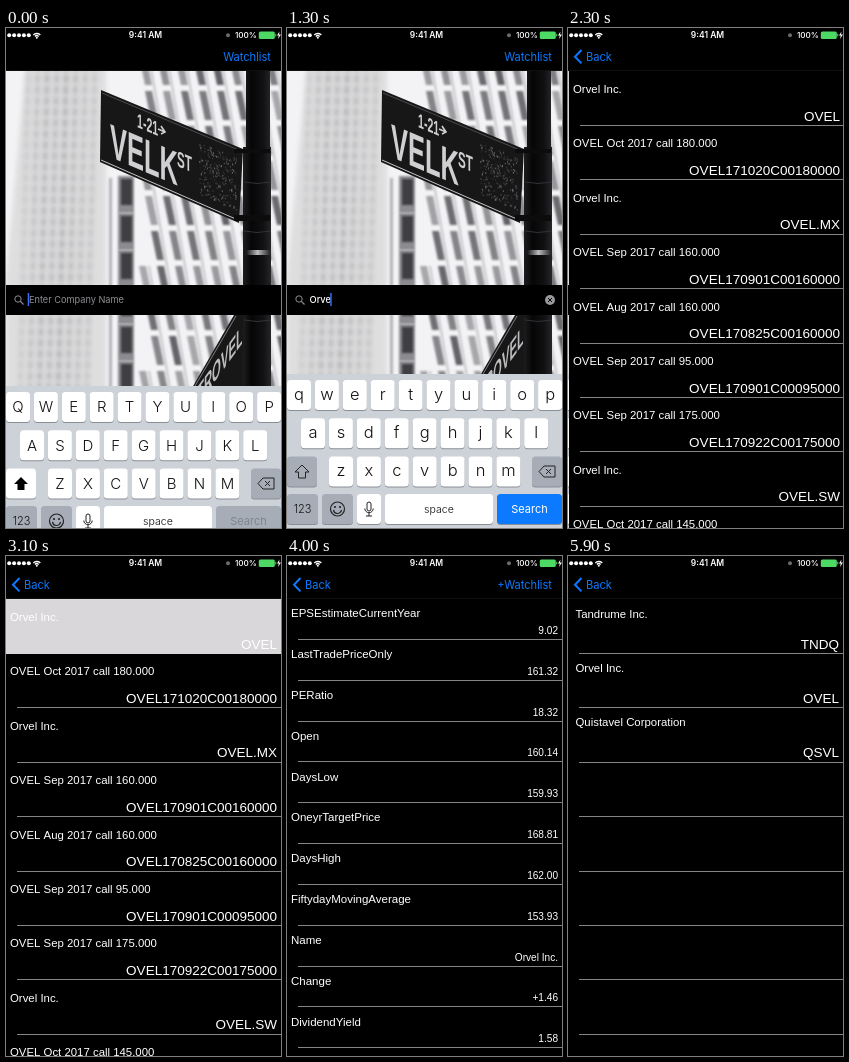
Write an HTML page with a canvas that moves like this. It is 275 px wide and 500 px high and loops after 6200 ms.

```html
<!DOCTYPE html>
<html lang="en">
<head>
<meta charset="utf-8">
<title>Stock lookup</title>
<style>
  html, body { margin: 0; width: 100%; height: 100%; overflow: hidden; background: #000; }
  canvas { display: block; width: 275px; height: 500px; }
</style>
</head>
<body>
<canvas id="stage"></canvas>
<script>
const W = 275, H = 500, LOOP = 6200, STEP = 100, NAV = 43;
const SANS = '"Liberation Sans", Arial, sans-serif';
const UI = 'Inter, Roboto, sans-serif';
const BLUE = '#0b7aff';
const COMPANY = 'Orvel', TICKER = 'OVEL';
const PUSH = { list: 1874, detail: 3540, watch: 4860 };
const SELECT_AT = 3100, SEARCH_AT = 1700, BUTTON_AT = 4800;
const TYPED_AT = [500, 700, 900, 1100, 1500];

const quotes = [
  [COMPANY + ' Inc.', TICKER],
  [TICKER + ' Oct 2017 call 180.000', TICKER + '171020C00180000'],
  [COMPANY + ' Inc.', TICKER + '.MX'],
  [TICKER + ' Sep 2017 call 160.000', TICKER + '170901C00160000'],
  [TICKER + ' Aug 2017 call 160.000', TICKER + '170825C00160000'],
  [TICKER + ' Sep 2017 call 95.000', TICKER + '170901C00095000'],
  [TICKER + ' Sep 2017 call 175.000', TICKER + '170922C00175000'],
  [COMPANY + ' Inc.', TICKER + '.SW'],
  [TICKER + ' Oct 2017 call 145.000', '']
];
const details = [
  ['EPSEstimateCurrentYear', '9.02'], ['LastTradePriceOnly', '161.32'],
  ['PERatio', '18.32'], ['Open', '160.14'], ['DaysLow', '159.93'],
  ['OneyrTargetPrice', '168.81'], ['DaysHigh', '162.00'],
  ['FiftydayMovingAverage', '153.93'], ['Name', COMPANY + ' Inc.'],
  ['Change', '+1.46'], ['DividendYield', '1.58']
];
const watched = [
  ['Tandrume Inc.', 'TNDQ'], [COMPANY + ' Inc.', TICKER],
  ['Quistavel Corporation', 'QSVL']
];

const canvas = document.getElementById('stage');
const scale = window.devicePixelRatio || 1;
canvas.width = W * scale;
canvas.height = H * scale;
const screen = canvas.getContext('2d');
let g = screen;

// Critically damped spring: 1 at the start, settling to 0.
function spring(ms) {
  if (ms <= 0) return 1;
  const u = ms / 1000 * 18.26;
  return u > 8 ? 0 : (1 + u) * Math.exp(-u);
}

function random(seed) {
  return () => (seed = (seed * 16807) % 2147483647) / 2147483647;
}

function text(str, x, y, size, color = '#fff', align = 'left', family = SANS, weight = 400) {
  g.font = `${weight} ${size}px ${family}`;
  g.fillStyle = color;
  g.textAlign = align;
  g.fillText(str, x, y);
}

function box(x, y, w, h, color, radius = 0) {
  g.fillStyle = color;
  g.beginPath();
  g.roundRect(x, y, w, h, radius);
  g.fill();
}

function poly(points, fill, stroke, width = 1) {
  g.beginPath();
  points.forEach(([x, y], i) => i ? g.lineTo(x, y) : g.moveTo(x, y));
  g.closePath();
  if (fill) { g.fillStyle = fill; g.fill(); }
  if (stroke) { g.strokeStyle = stroke; g.lineWidth = width; g.stroke(); }
}

function line(points, color, width) {
  g.beginPath();
  points.forEach(([x, y], i) => i ? g.lineTo(x, y) : g.moveTo(x, y));
  g.strokeStyle = color;
  g.lineWidth = width;
  g.stroke();
}

function circle(x, y, r, fill, stroke, width = 1) {
  g.beginPath();
  g.arc(x, y, r, 0, Math.PI * 2);
  if (fill) { g.fillStyle = fill; g.fill(); }
  if (stroke) { g.strokeStyle = stroke; g.lineWidth = width; g.stroke(); }
}

function group(draw) {
  g.save();
  draw();
  g.restore();
}

// ---- Street picture ----

function drawBuildings() {
  const rnd = random(71);
  box(0, 33, W, 340, '#f3f3f5');
  g.filter = `blur(${2 * scale}px)`;
  poly([[20, 33], [100, 33], [100, 373], [0, 373], [0, 250]], '#dededf');
  for (let col = 0; col < 8; col++) {
    const shade = .2 + rnd() * .3;
    for (let y = 36; y < 370; y += 11) {
      box(21 + col * 9.5 - y * .025, y, 4.5, 8, `rgba(120,120,125,${shade})`);
    }
  }
  g.filter = `blur(${1.3 * scale}px)`;
  for (let y = 148; y < 370; y += 37) {
    box(112, y, 16, 37, '#8c8c90');
    box(115, y + 3, 11, 26, '#3f3f43');
  }
  box(103, 150, 3, 220, '#b4b4b8');
  for (let row = 0; row < 10; row++) {
    for (let col = -3; col < 9; col++) {
      const x = 133 + col * 18 + row * 6, y = 28 + row * 35;
      if (x < 130) continue;
      poly([[x, y], [x + 7, y], [x + 13, y + 29], [x + 6, y + 29]],
        `rgba(70,70,76,${.4 + rnd() * .45})`);
      line([[x + 10, y], [x + 16, y + 35]], 'rgba(120,120,126,.45)', 1.5);
    }
  }
  g.filter = 'none';
}

function drawPole() {
  const steel = g.createLinearGradient(237, 0, 266, 0);
  steel.addColorStop(0, '#1d1d1f');
  steel.addColorStop(.3, '#060607');
  steel.addColorStop(.7, '#111113');
  steel.addColorStop(1, '#29292b');
  box(240, 43, 24, 78, steel);
  box(237, 119, 28, 245, steel);
  box(228, 121, 36, 4, '#0c0c0d');
  box(228, 187, 36, 6, '#0c0c0d');
  for (const y of [154, 203, 292]) line([[238, y], [251, y + 1.5], [265, y]], '#333336', 1);
  const shine = g.createLinearGradient(238, 0, 265, 0);
  shine.addColorStop(.1, '#1a1a1c');
  shine.addColorStop(.5, '#bcbcbe');
  shine.addColorStop(.95, '#2a2a2c');
  box(238, 222, 27, 5, shine);
}

function drawSigns() {
  const rnd = random(9);
  poly([[95, 62], [237, 121], [233, 195], [94, 134]], '#171718');
  line([[96, 65], [235, 123]], '#58585b', .8);
  line([[95, 132], [232, 192]], '#c4c4c7', 1);
  for (let i = 0; i < 300; i++) {
    const x = 193 + rnd() * 37, y = 114 + (x - 193) * .42 + rnd() * 52;
    box(x, y, 1, 1 + rnd(), `rgba(190,190,194,${rnd() * .5})`);
  }
  // Lettering lies in the plane of the plate.
  const onPlate = (str, x, y, size) => group(() => {
    g.transform(.53, .225, 0, 1, x, y);
    text(str, 0, 0, size, '#d0d0d2', 'left', SANS, 700);
  });
  onPlate('VELK', 104, 129, 48);
  onPlate('ST', 171, 138, 22);
  onPlate('1-21', 131, 99, 20);
  line([[152, 101], [159, 104]], '#d0d0d2', 1.6);
  line([[155, 98], [159, 104], [155, 106]], '#d0d0d2', 1.6);

  poly([[186, 360], [228, 287], [238, 287], [238, 362]], '#171718');
  line([[189, 358], [230, 288]], '#9a9a9d', .8);
  group(() => {
    g.beginPath();
    g.rect(184, 287, 52, 75);
    g.clip();
    g.transform(.42, -.58, 0, 1, 191, 378);
    text('TROVELAN', 0, 0, 27, '#bdbdbf', 'left', SANS, 700);
  });
}

function renderPhoto() {
  const layer = document.createElement('canvas');
  layer.width = W * scale;
  layer.height = 365 * scale;
  g = layer.getContext('2d');
  g.scale(scale, scale);
  drawBuildings();
  drawSigns();
  drawPole();
  g = screen;
  return layer;
}
const photo = renderPhoto();

// ---- Search page ----

function drawField(t) {
  const count = TYPED_AT.filter(at => t >= at).length;
  const typed = COMPANY.slice(0, count);
  box(0, 257, W, 30, '#000');
  circle(12, 271, 3.2, null, '#8e8e93');
  line([[14.4, 273.4], [17.5, 276.5]], '#8e8e93', 1.2);
  if (typed) text(typed, 22.5, 275.3, 9.3, '#fff', 'left', UI, 500);
  else text('Enter Company Name', 23, 275.3, 9.2, '#8e8e93', 'left', UI);
  if (t < SEARCH_AT) {
    g.font = `500 9.3px ${UI}`;
    box(21.7 + g.measureText(typed).width, 265, 1.5, 13, '#3b6cf6');
  }
  if (typed) {
    circle(263, 272, 5, '#98989c');
    line([[261, 270], [265, 274]], '#000', 1);
    line([[265, 270], [261, 274]], '#000', 1);
  }
}

function key(x, y, w, color = '#fff') {
  box(x, y + 1, w, 30, '#8a8e95', 3.5);
  box(x, y, w, 30, color, 3.5);
}

function drawKeyboard(t) {
  const upper = t < TYPED_AT[0], grey = '#a6adb7', ink = '#111';
  box(0, 346, W, 170, '#cdd1d8');
  [['qwertyuiop', 12], ['asdfghjkl', 26], ['zxcvbnm', 54]].forEach(([letters, first], row) => {
    [...letters].forEach((letter, i) => {
      const x = first + i * 27.9, y = 352 + row * 38.3;
      key(x - 12, y, 24);
      text(upper ? letter.toUpperCase() : letter, x, y + (upper ? 20.3 : 19.5),
        upper ? 15 : 16.5, ink, 'center', UI, 300);
    });
  });

  key(0, 428.6, 30, upper ? '#fff' : grey);
  poly([[15, 437], [22, 444], [18.5, 444], [18.5, 450], [11.5, 450], [11.5, 444], [8, 444]],
    upper ? '#000' : null, upper ? null : '#222', 1);
  key(245, 428.6, 30, grey);
  poly([[252, 443.5], [257, 438], [268, 438], [268, 449], [257, 449]], null, '#222', 1);
  line([[259, 441], [264, 446]], '#222', 1);
  line([[264, 441], [259, 446]], '#222', 1);

  const y = 466;
  key(0, y, 31, grey);
  text('123', 15.5, y + 19, 11, ink, 'center', UI, 300);
  key(35, y, 31, grey);
  circle(50.5, y + 15, 7, null, '#222', 1.2);
  circle(48, y + 13, 1.1, '#222');
  circle(53, y + 13, 1.1, '#222');
  g.beginPath();
  g.arc(50.5, y + 15.5, 4, .1, Math.PI - .1);
  g.stroke();
  key(70, y, 24);
  g.strokeStyle = '#222';
  g.lineWidth = 1;
  g.beginPath();
  g.roundRect(80, y + 8, 4, 9, 2);
  g.stroke();
  g.beginPath();
  g.arc(82, y + 14.5, 4.2, 0, Math.PI);
  g.stroke();
  line([[82, y + 19], [82, y + 22]], '#222', 1);
  line([[79, y + 22], [85, y + 22]], '#222', 1);
  key(98, y, 108);
  text('space', 152, y + 18.5, 10.6, ink, 'center', UI, 300);
  const pressed = t >= SEARCH_AT;
  key(210, y, 65, upper ? grey : pressed ? '#fff' : BLUE);
  text('Search', 242.5, y + 18.5, 11, upper ? '#7f858e' : pressed ? ink : '#fff', 'center', UI);
}

function searchPage(t) {
  g.drawImage(photo, 0, 0, W, 365);
  drawField(t);
  group(() => {
    g.translate(0, 154 * spring(t + 230));
    drawKeyboard(t);
  });
}

// ---- Table pages ----

function separator(y) {
  box(11, y, W, 1, '#858585');
}

function listPage(t) {
  if (t >= SELECT_AT) box(0, NAV, W, 55, '#d9d7d9');
  quotes.forEach(([name, symbol], i) => {
    const y = NAV + i * 54.4;
    text(name, 4, y + 22, 11.4);
    text(symbol, 271, y + 49.5, 13.5, '#fff', 'right');
    if (i || t < SELECT_AT) separator(Math.round(y + 54));
  });
}

function detailPage() {
  details.forEach(([label, value], i) => {
    const y = NAV + i * 40.83;
    text(label, 4, y + 18.3, 11.5);
    text(value, 271, y + 35, 10.1, '#fff', 'right');
    separator(Math.round(y + 40));
  });
}

function watchPage() {
  for (let i = 0; i < 8; i++) {
    const y = NAV + i * 54.4;
    if (watched[i]) {
      text(watched[i][0], 7.5, y + 18.5, 11.4);
      text(watched[i][1], 271, y + 49.5, 13.5, '#fff', 'right');
    }
    separator(Math.round(y + 54));
  }
}

// ---- Bars ----

function drawStatus() {
  for (let i = 0; i < 5; i++) circle(3.2 + i * 4.9, 7.2, 2, '#fff');
  for (const r of [2.6, 4.8]) {
    g.beginPath();
    g.arc(30.8, 10.3, r, -Math.PI * .76, -Math.PI * .24);
    g.strokeStyle = '#fff';
    g.lineWidth = 1.3;
    g.stroke();
  }
  circle(30.8, 9.8, 1, '#fff');
  text('9:41 AM', 139.5, 10.3, 8.5, '#fff', 'center', UI, 600);
  circle(222, 7.2, 2, '#6c6c70');
  text('100%', 251, 10.3, 8.2, '#fff', 'right', UI, 500);
  box(252.8, 3.4, 16, 7.6, '#4cd964', 1.5);
  box(269.2, 5.8, 1, 2.8, '#4cd964');
  poly([[273.5, 3.5], [271, 7.6], [272.8, 7.6], [272, 11], [275, 6.6], [273, 6.6]], '#fff');
}

function barItem(alpha, draw) {
  if (alpha <= 0) return;
  group(() => { g.globalAlpha = alpha; draw(); });
}

function drawBar(t, list, detail, watch) {
  box(0, 0, W, NAV, '#000');
  box(0, NAV - 1, W, 1, '#101011');
  drawStatus();
  const button = label => () => text(label, 265, 33, 11.1, BLUE, 'right', UI);
  barItem(list ** 4, button('Watchlist'));
  barItem((1 - list) ** 2, () => {
    line([[13.5, 22], [7, 28.7], [13.5, 35.4]], BLUE, 2);
    text('Back', 18, 33, 11.1, BLUE, 'left', UI);
  });
  const press = t >= BUTTON_AT ? .35 : 1;
  barItem((1 - detail) ** 2 * watch ** 4 * press, button('+Watchlist'));
}

function push(from, to, offset, t) {
  if (offset > 0) {
    group(() => {
      g.translate(-W * .33 * (1 - offset), 0);
      from(t);
    });
  }
  if (offset < 1) {
    group(() => {
      g.translate(Math.round(W * offset), 0);
      box(0, NAV, W, H, '#000');
      to(t);
    });
  }
}

function draw(t) {
  const list = spring(t - PUSH.list);
  const detail = spring(t - PUSH.detail);
  const watch = spring(t - PUSH.watch);
  g.setTransform(scale, 0, 0, scale, 0, 0);
  box(0, 0, W, H, '#000');
  if (t < PUSH.detail) push(searchPage, listPage, list, t);
  else if (t < PUSH.watch) push(listPage, detailPage, detail, t);
  else push(detailPage, watchPage, watch, t);
  drawBar(t, list, detail, watch);
}

function tick() {
  const t = performance.now() % LOOP;
  draw(Math.floor(t / STEP) * STEP);
  requestAnimationFrame(tick);
}
tick();
</script>
</body>
</html>
```
